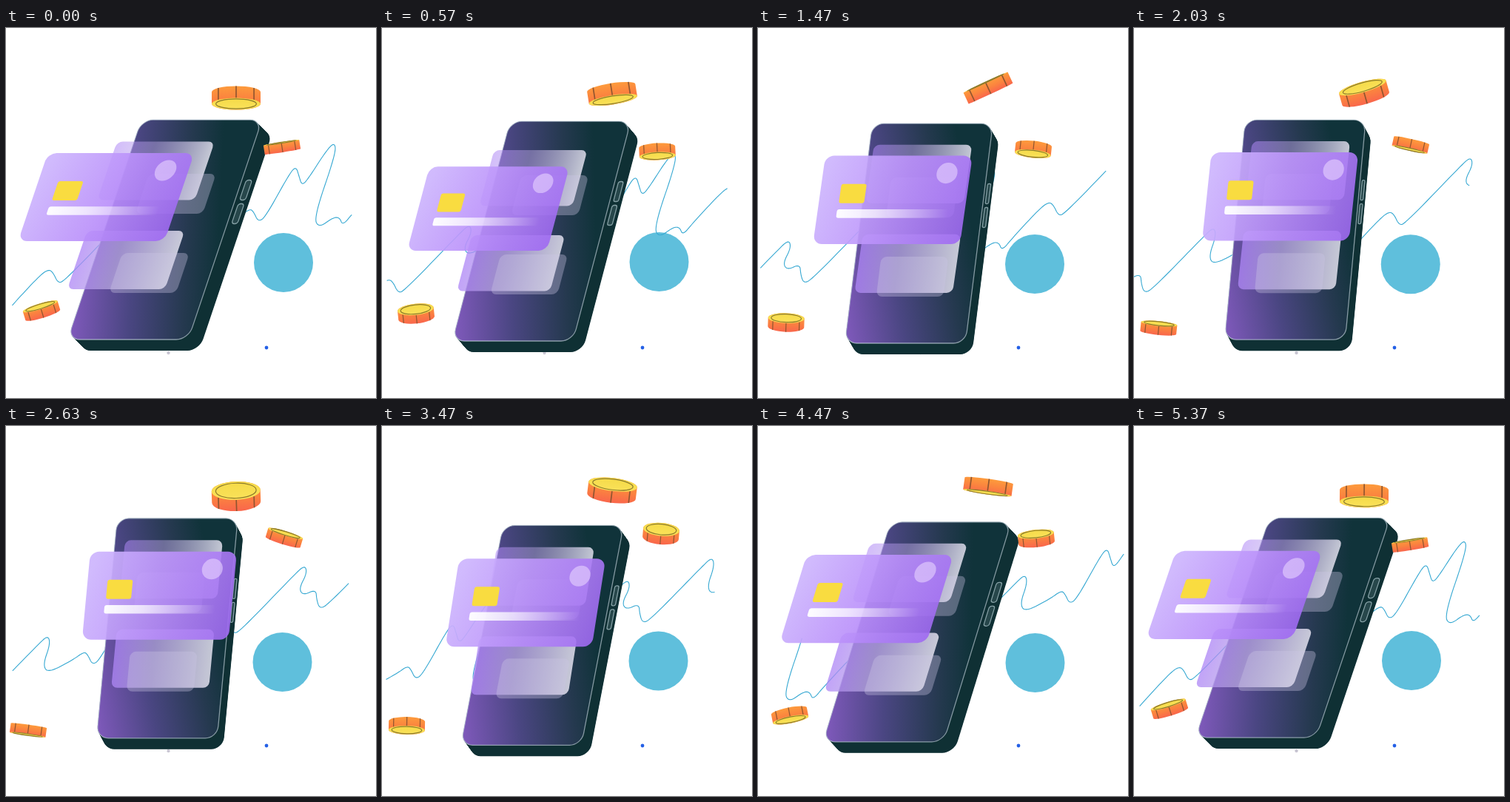
An HTML page with a canvas that plays this animation: 500x500 px, repeating every 5410 ms.

```html
<!DOCTYPE html>
<html lang="en">
<head>
<meta charset="utf-8">
<title>Mobile wallet</title>
<style>
  html, body { margin: 0; width: 100%; height: 100%; overflow: hidden; background: #fff; }
  canvas { display: block; width: 100%; height: 100%; }
</style>
</head>
<body>
<canvas id="stage"></canvas>
<script>
const LOOP = 5410;
const POSES = [0, 570, 1470, 2630, 3470, 4470];
const canvas = document.getElementById('stage');
const ctx = canvas.getContext('2d');

// Periodic smooth curve through values at given times; `gain` is added per loop.
function track(values, times = POSES, gain = 0) {
  const n = values.length;
  const at = i => {
    const lap = Math.floor(i / n), k = i - lap * n;
    return [times[k] + lap * LOOP, values[k] + lap * gain];
  };
  const slope = i => {
    const [t0, v0] = at(i - 1), [t1, v1] = at(i + 1);
    return (v1 - v0) / (t1 - t0);
  };
  return t => {
    let i = n - 1;
    while (i > 0 && times[i] > t) i--;
    const [t0, v0] = at(i), [t1, v1] = at(i + 1);
    const d = t1 - t0, u = (t - t0) / d, u2 = u * u, u3 = u2 * u;
    return v0 * (2 * u3 - 3 * u2 + 1) + v1 * (3 * u2 - 2 * u3) +
      d * (slope(i) * (u3 - 2 * u2 + u) + slope(i + 1) * (u3 - u2));
  };
}

// Phone, panels and card
const lean = track([.336, .263, .125, .094, .192, .307]);
const cardLean = track([.338, .265, .142, .094, .157, .307]);
const bob = track(
  [0, 0, 2, 8, 10, 5, 1, 0, .8, 6, 10.3, 11, 9.5, 5.8, 1.5],
  [0, 350, 570, 850, 1100, 1470, 1800, 2300, 2630, 3050, 3470, 3740, 4000, 4470, 5000]);
const shrink = track([1, .955, 1, 1, 1], [0, 570, 1200, 2600, 4000]);
const cardShift = track([-94, -80, -41, -14.5, -31, -82]);
const panelShift = track([-38.7, -30, -10, -2, -17, -34.5]);

function gradient(x0, y0, x1, y1, ...stops) {
  const g = ctx.createLinearGradient(x0, y0, x1, y1);
  stops.forEach(([p, c]) => g.addColorStop(p, c));
  return g;
}

// Rounded box around a centre
function box(x, y, w, h, r) {
  ctx.beginPath();
  ctx.roundRect(x - w / 2, y - h / 2, w, h, r);
}

function phone(t) {
  const s = lean(t), k = shrink(t);
  const cx = 219 - 13 * s, cy = 272.5 + bob(t);
  const depth = 5.2 + 29 * s;
  const extraLean = cardLean(t) - s;

  ctx.save();
  ctx.translate(cx, cy);
  ctx.transform(1, 0, -s, 1, 0, 0);

  ctx.fillStyle = '#0f3034';
  for (let i = 0; i <= 30; i++) {
    const y = i / 2;
    box(depth * i / 30 + s * y, y, 163, 297, 16);
    ctx.fill();
  }

  box(0, 0, 163, 297, 16);
  ctx.fillStyle = gradient(-81.5, 121.5, 93.5, 71.5,
    [0, '#7c58b8'], [.39, '#4a4682'], [.78, '#25394f'], [1, '#10333a']);
  ctx.fill();
  ctx.strokeStyle = 'rgba(205,218,228,.62)';
  ctx.lineWidth = 1.3;
  ctx.stroke();

  const side = depth + 15 * s;
  ctx.strokeStyle = 'rgba(170,195,200,.75)';
  ctx.fillStyle = 'rgba(150,175,185,.18)';
  for (const y of [-53.5, -21.5]) {
    box(81.5 + side / 2, y, side * .4, 27, side * .17);
    ctx.fill();
    ctx.stroke();
  }

  const pivot = 91.5;
  const scaled = y => pivot + (y - pivot) * k;
  const near = panelShift(t);
  panel(near, scaled(-79.5), k, extraLean, .55, .46);
  panel(near, scaled(41), k, extraLean, .76, .72);

  ctx.fillStyle = 'rgba(203,196,226,.36)';
  for (const y of [-48.5, 58.5]) {
    box(-1.5, y, 91, 54, 8);
    ctx.fill();
  }

  ctx.translate(cardShift(t), scaled(-44) + 167 * (1 - k));
  ctx.transform(k, 0, -extraLean * k, k, 0, 0);
  card();
  ctx.restore();
}

function panel(x, y, k, extraLean, startAlpha, midAlpha) {
  ctx.save();
  ctx.translate(x, y);
  ctx.transform(k, 0, -extraLean * k, k, 0, 0);
  box(0, 0, 132, 79, 8);
  ctx.fillStyle = gradient(-66, 0, 66, 0,
    [0, `rgba(174,134,246,${startAlpha})`], [.4, `rgba(186,168,228,${midAlpha})`],
    [1, 'rgba(232,230,243,.83)']);
  ctx.fill();
  ctx.restore();
}

function card() {
  box(0, 0, 198, 119, 12);
  ctx.fillStyle = gradient(-99, -20, 99, 35,
    [0, 'rgba(205,181,253,.93)'], [.5, 'rgba(186,144,250,.9)'], [1, 'rgba(160,107,242,.9)']);
  ctx.fill();

  box(-55, -8.5, 34, 26, 3);
  ctx.fillStyle = '#f9dc40';
  ctx.fill();

  box(2, 18.5, 150, 11.5, 3);
  ctx.fillStyle = gradient(-73, 0, 77, 0,
    [0, 'rgba(255,255,255,.97)'], [.35, 'rgba(255,255,255,.72)'], [1, 'rgba(255,255,255,0)']);
  ctx.fill();

  disc(68, -36, 14, 'rgba(232,212,255,.6)');
}

// Coins: tilt in the plane, pitch towards or away from the viewer (degrees)
const coins = [
  { r: 33, x: track([311, 311, 311, 311, 311, 311]), y: track([94.5, 89, 81, 95, 87, 82]),
    tilt: track([0, -9, -25, -2, 7, 8]), pitch: track([-14, -11, 1, 22, 15.5, -4]) },
  { r: 24.5, x: track([373, 372, 372, 376, 377, 376]), y: track([161, 167, 164, 151, 145.5, 152]),
    tilt: track([-9, -3, 6, 17, 5, -6]), pitch: track([2, -13, -13, 7, 21, 14]) },
  { r: 24.5, x: track([48, 46, 38, 30, 33.5, 43]), y: track([382, 386, 398, 411, 405, 391]),
    tilt: track([-17, -6, 2, 8, 1, -11]), pitch: track([9, 18, 16, -3, -14, -11]) }
];

function coin({ r, x, y, tilt, pitch }, t) {
  const rad = Math.PI / 180, p = pitch(t) * rad;
  const sign = p < 0 ? -1 : 1;
  const ry = r * Math.abs(Math.sin(p)), half = r * .25 * Math.cos(p);

  ctx.save();
  ctx.translate(x(t), y(t));
  ctx.rotate(tilt(t) * rad);

  ctx.beginPath();
  ctx.ellipse(0, -half, r, ry, 0, Math.PI, 2 * Math.PI);
  ctx.ellipse(0, half, r, ry, 0, 0, Math.PI);
  ctx.closePath();
  ctx.fillStyle = gradient(0, -half - ry, 0, half + ry, [0, '#fd9b3c'], [.5, '#fb843f'], [1, '#f9664c']);
  ctx.fill();

  ctx.strokeStyle = '#8f5530';
  ctx.lineWidth = r * .05;
  for (const u of [-.73, 0, .73]) {
    const edge = sign * ry * Math.sqrt(1 - u * u);
    ctx.beginPath();
    ctx.moveTo(u * r, edge - half);
    ctx.lineTo(u * r, edge + half);
    ctx.stroke();
  }

  ctx.beginPath();
  ctx.ellipse(0, -sign * half, r, ry, 0, 0, 7);
  ctx.fillStyle = gradient(0, -sign * half - ry, 0, -sign * half + ry + .1, [0, '#f5da48'], [1, '#fae25a']);
  ctx.fill();
  ctx.beginPath();
  ctx.ellipse(0, -sign * half, r * .83, ry * .82, 0, 0, 7);
  ctx.strokeStyle = '#8d7b2c';
  ctx.lineWidth = 1.2;
  ctx.stroke();
  ctx.restore();
}

// Price line: one repeating stretch that drifts down-left
const STEP = [461, -125];
const KNOTS = [
  8, 375, 46, 334, 58, 326, 64, 331, 70, 344, 78, 343, 152, 266, 167, 252, 170, 263,
  159, 284, 165, 293, 182, 285, 183, 299, 187, 311, 198, 306, 268, 234, 281, 222, 284, 234,
  274, 262, 281, 273, 315, 255, 330, 244, 335, 249, 341, 262, 351, 255, 383, 197, 392, 187,
  396, 200, 400, 213, 409, 203, 432, 167, 444, 154, 446, 169, 416, 256, 423, 270, 442, 256,
  451, 256, 455, 267
];

const wave = (() => {
  const n = KNOTS.length / 2, fine = 10, pts = [];
  const knot = i => {
    const lap = Math.floor(i / n), k = i - lap * n;
    return [0, 1].map(a => KNOTS[2 * k + a] + lap * STEP[a]);
  };
  let len = 0, lap = 0;
  for (let i = 0; i < 2 * n + 3; i++) {
    const p = knot(i - 1), q = knot(i), r = knot(i + 1);
    for (let j = 0; j < fine; j++) {
      const u = j / fine, a = (1 - u) ** 2 / 2, c = u * u / 2, b = 1 - a - c;
      const x = a * p[0] + b * q[0] + c * r[0];
      const y = a * p[1] + b * q[1] + c * r[1];
      const last = pts[pts.length - 1];
      if (last) len += Math.hypot(x - last.x, y - last.y);
      if (i === n && j === 0) lap = len;
      pts.push({ x, y, len });
    }
  }
  return { pts, lap };
})();

const head = track([.011, .085, .2, .404, .563, .85], POSES, 1);
const gap = track([0, 0, -.012, 0, .019, .079]);

function priceLine(t) {
  const from = head(t) * wave.lap, to = from + (1 - gap(t)) * wave.lap;
  const f = t / LOOP;
  ctx.save();
  ctx.translate(-STEP[0] * f, -STEP[1] * f);
  ctx.beginPath();
  for (const p of wave.pts) if (p.len >= from && p.len <= to) ctx.lineTo(p.x, p.y);
  ctx.strokeStyle = '#36a8d2';
  ctx.lineWidth = 1.1;
  ctx.lineJoin = 'round';
  ctx.stroke();
  ctx.restore();
}

// Plain floating token
const tokenX = track([375, 374.5, 374, 373.5, 373.5, 374.5]);
const tokenY = track([317, 316, 319, 319, 317.5, 320]);

function disc(x, y, r, fill) {
  ctx.beginPath();
  ctx.arc(x, y, r, 0, 7);
  ctx.fillStyle = fill;
  ctx.fill();
}

function draw(t) {
  const dpr = window.devicePixelRatio || 1;
  const w = Math.round(innerWidth * dpr), h = Math.round(innerHeight * dpr);
  if (canvas.width !== w || canvas.height !== h) {
    canvas.width = w;
    canvas.height = h;
  }
  ctx.setTransform(w / 500, 0, 0, h / 500, 0, 0);
  ctx.fillStyle = '#fff';
  ctx.fillRect(0, 0, 500, 500);

  disc(tokenX(t), tokenY(t), 40, '#5fbfdc');
  priceLine(t);
  disc(219.5, 439, 2.2, '#c9c6d3');
  disc(352, 432, 2.4, '#2460e6');
  phone(t);
  coins.forEach(c => coin(c, t));
}

function tick() {
  draw(performance.now() % LOOP);
  requestAnimationFrame(tick);
}
tick();
</script>
</body>
</html>
```
